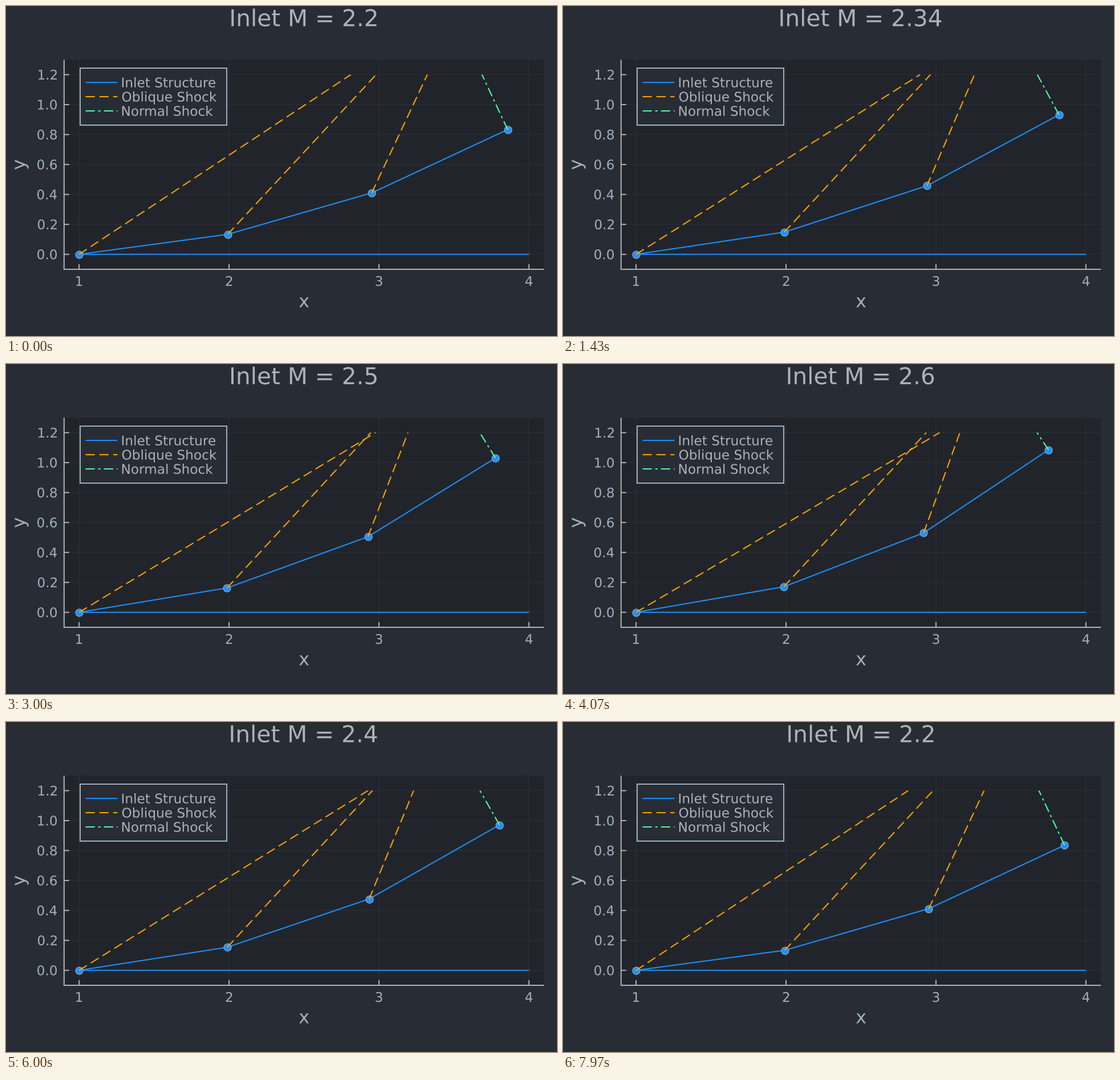
Write a matplotlib script that moves like this. It is 966 px wide and 579 px high and loops after 8.01 s.

```python
import numpy as np
import matplotlib.pyplot as plt
from matplotlib.animation import FuncAnimation
from matplotlib.patches import PathPatch, Rectangle
from matplotlib.textpath import TextPath
from matplotlib.transforms import Affine2D

plt.rcParams["font.family"] = "DejaVu Sans"
plt.rcParams["path.snap"] = False

W, H, DPI = 966, 579, 96
PT = 72 / DPI                       # points per pixel
LOOP, FRAMES = 8010, 240
BG, PANEL, FG, SOFT = "#282C34", "#21252B", "#ADB2B7", "#9EB1BE"
BLUE, ORANGE, GREEN = "#1E90FF", "#FFA500", "#54FF9F"
DASH, DASHDOT = (0, (8, 4)), (0, (8, 3, 2, 3))
LW = 2.02
SMALL, MEDIUM, LARGE = 23.2, 31.9, 40.6
GAMMA, EXIT_MACH, TOP = 1.4, 1.3, 1.2

fig = plt.figure(figsize=(W / DPI, H / DPI), dpi=DPI, facecolor=BG)
ax = fig.add_axes([0, 0, 1, 1])
ax.set(xlim=(0, W), ylim=(H, 0))
ax.axis("off")


def px(x):
    return 128.1 + 262.9 * (np.asarray(x) - 1)


def py(y):
    return 435.7 - 262.7 * np.asarray(y)


def line(xs, ys, color, width=LW, z=2, **kw):
    return ax.plot(xs, ys, color=color, lw=width * PT, zorder=z,
                   solid_capstyle="butt", dash_capstyle="butt", **kw)[0]


def glyphs(s, x, y, size, align=0.5, turn=0):
    """Outline of s with its baseline at y, anchored at a fraction of its width."""
    path = TextPath((0, 0), s, size=size)
    box = path.get_extents()
    shift = box.x0 + align * box.width
    return (Affine2D().translate(-shift, 0).scale(1, -1).rotate_deg(turn)
            .translate(x, y).transform_path(path))


def label(s, x, y, size, color, align=0.5, turn=0):
    patch = PathPatch(glyphs(s, x, y, size, align, turn), fc=color, lw=0, zorder=8)
    return ax.add_patch(patch)


def oblique(mach, normal):
    """Shock angle, flow deflection and Mach number behind an oblique shock."""
    beta = np.arcsin(min(1, normal / mach))
    n2 = normal ** 2
    theta = np.arctan(2 / np.tan(beta) * (n2 - 1)
                      / (mach ** 2 * (GAMMA + np.cos(2 * beta)) + 2))
    behind = np.sqrt((1 + (GAMMA - 1) / 2 * n2) / (GAMMA * n2 - (GAMMA - 1) / 2))
    return beta, theta, behind / np.sin(beta - theta)


def shock_train(mach, normal):
    angles, turn = [], 0
    for _ in range(3):
        beta, theta, mach = oblique(mach, normal)
        angles.append((turn + beta, turn + theta))
        turn += theta
    return np.array(angles), mach


def design(mach):
    """Three shocks of equal strength that leave the exit Mach number."""
    lo, hi = 1.001, 1.5
    for _ in range(40):
        mid = (lo + hi) / 2
        if shock_train(mach, mid)[1] > EXIT_MACH:
            lo = mid
        else:
            hi = mid
    return shock_train(mach, lo)[0]


# plot area, grid and axes
x0, x1, y0, y1 = px(0.9), px(4.1), py(-0.1), py(1.3)
ax.add_patch(Rectangle((x0, y1), x1 - x0, y0 - y1, fc=PANEL, lw=0, zorder=0))
for v in range(1, 5):
    x = px(v)
    line([x, x], [y0, y1], FG, 1, 1, alpha=0.1)
    line([x, x], [y0, y0 - 9], FG)
    label(str(v), x, 491, SMALL, SOFT)
for i in range(7):
    y = py(0.2 * i)
    line([x0, x1], [y, y], FG, 1, 1, alpha=0.1)
    line([x0, x0 + 9], [y, y], FG)
    label(f"{0.2 * i:.1f}", 89, y + 8.5, SMALL, SOFT, 1)
line([x0, x0], [y0 + 1, y1], FG)
line([x0, x1], [y0, y0], FG)
label("x", 522.5, 528.6, MEDIUM, SOFT)
label("y", 33, 278.3, MEDIUM, SOFT, turn=-90)

# legend
ax.add_patch(Rectangle((130, 109), 257, 100, fc=BG, ec=SOFT, lw=LW * PT, zorder=6))
entries = [("Inlet Structure", BLUE, "-"), ("Oblique Shock", ORANGE, DASH),
           ("Normal Shock", GREEN, DASHDOT)]
for i, (name, color, style) in enumerate(entries):
    y = 134.1 + 25 * i
    line([139.5, 195.5], [y, y], color, z=7, ls=style)
    label(name, 203.8, y + 8.5, SMALL, FG, 0)

# moving parts
line(px([1, 4]), py([0, 0]), BLUE, z=3)
wall = line([], [], BLUE, z=3, marker="o", ms=13 * PT, mec=FG, mew=PT)
shocks = [line([], [], ORANGE, z=4, ls=DASH) for _ in range(3)]
exit_shock = line([], [], GREEN, z=4, ls=DASHDOT)
title = label("Inlet M = 2.2", 522.3, 35.4, LARGE, FG)

HALF = FRAMES // 2
sweep = np.linspace(2.2, 2.6, HALF)


def ray(art, x, y, angle):
    """Draw from (x, y) along the angle up to the top of the plot."""
    end = x + (TOP - y) / np.tan(angle)
    art.set_data(px([x, end]), py([y, TOP]))


def draw(k):
    mach = sweep[k] if k < HALF else sweep[FRAMES - 1 - k]
    angles = design(mach)
    beta, turn = angles.T
    xs = 1 + np.append(0, np.cumsum(np.cos(turn)))
    ys = np.append(0, np.cumsum(np.sin(turn)))
    wall.set_data(px(xs), py(ys))
    for art, x, y, b in zip(shocks, xs, ys, beta):
        ray(art, x, y, b)
    ray(exit_shock, xs[3], ys[3], turn[2] + np.pi / 2)
    title.set_path(glyphs(f"Inlet M = {round(float(mach), 2)}", 522.3, 35.4, LARGE))
    return [wall, *shocks, exit_shock, title]


anim = FuncAnimation(fig, draw, frames=FRAMES, interval=LOOP / FRAMES, repeat=True)
plt.show()
```
